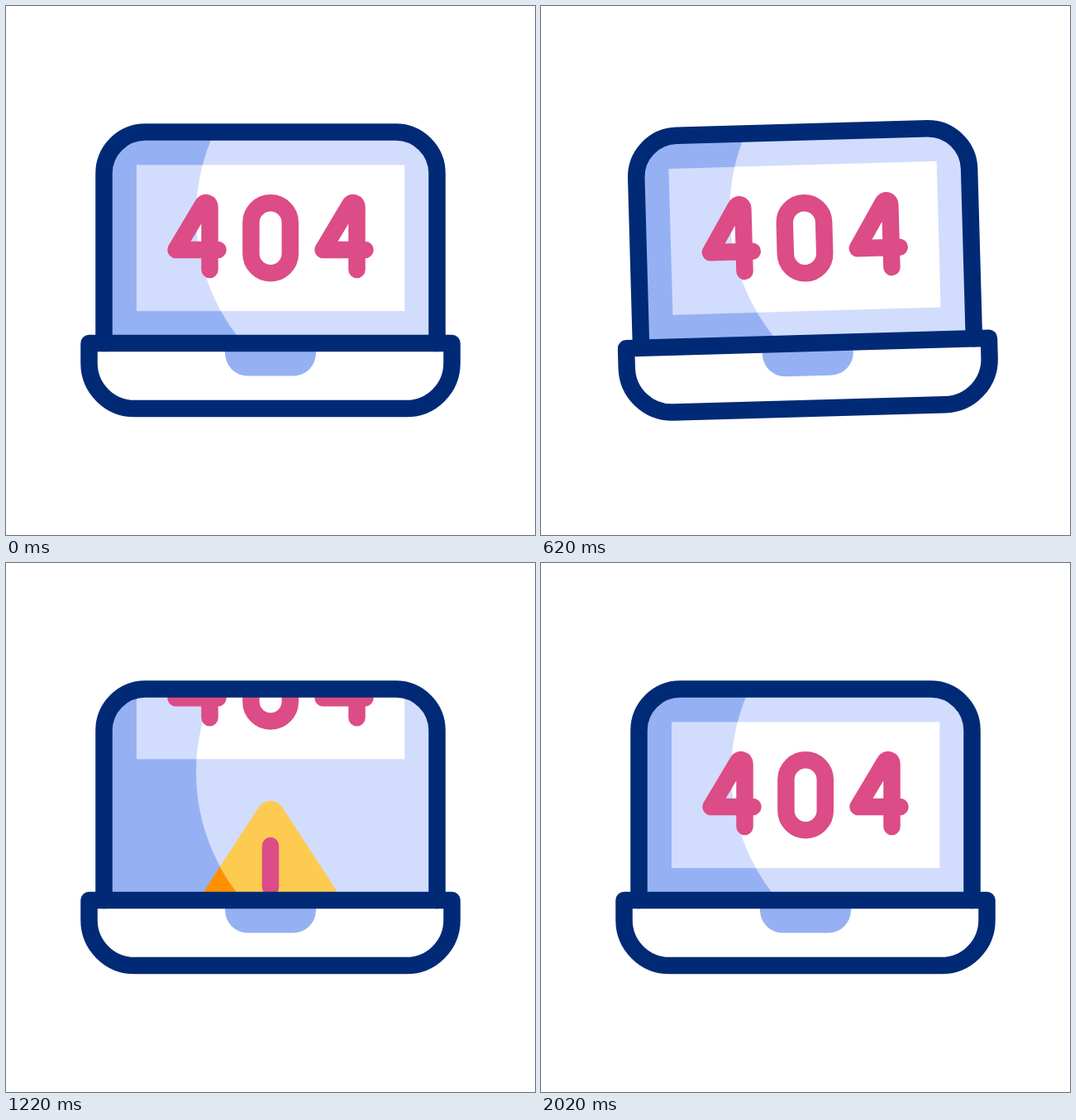
Animation, 640 px wide and 640 px high, one loop 2400 ms. Source, as an HTML page with a canvas:

```html
<!DOCTYPE html>
<html lang="en">
<head>
<meta charset="utf-8">
<title>404 laptop</title>
<style>
  html, body { margin: 0; width: 100%; height: 100%; overflow: hidden; background: #fff; }
  canvas { display: block; width: 640px; height: 640px; }
</style>
</head>
<body>
<canvas id="stage" width="640" height="640"></canvas>
<script>
const ctx = document.getElementById('stage').getContext('2d');
const LOOP = 2400;
const NAVY = '#012a76', PINK = '#dc4c86', LIGHT = '#d2dcfd', MID = '#95b1f3';
const LINE = 20.5;

const clamp = x => Math.min(1, Math.max(0, x));
const smooth = x => x * x * (3 - 2 * x);
const ramp = (t, a, b) => clamp((t - a) / (b - a));
const ease = (t, a, b) => smooth(ramp(t, a, b));

// Shapes
const lid = new Path2D('M118.5 408V202.5a50 50 0 0 1 50-50H471.5a50 50 0 0 1 50 50V408');
const base = new Path2D('M100.5 408H539.5V432a55 55 0 0 1-55 55H155.5a55 55 0 0 1-55-55Z');
const notch = new Path2D('M265 408H375V420a27.5 27.5 0 0 1-27.5 27.5H292.5a27.5 27.5 0 0 1-27.5-27.5Z');
const four = new Path2D('M256.5 295H205.5L238 240.5C240.5 236 246.5 238 246.5 243V319');
const zero = new Path2D();
zero.roundRect(296.4, 238.2, 47.4, 85.1, 23.7);
const glow = new Path2D();
glow.arc(470, 253, 240, 0, Math.PI * 2);

const sign = new Path2D();
const apex = 405.3, foot = 603.5, half = 129;
sign.moveTo(320, foot);
sign.arcTo(320 - half, foot, 320, apex, 20);
sign.arcTo(320, apex, 320 + half, foot, 17);
sign.arcTo(320 + half, foot, 320, foot, 20);
sign.closePath();

function fill(path, color) {
  ctx.fillStyle = color;
  ctx.fill(path);
}

function stroke(path, color) {
  ctx.strokeStyle = color;
  ctx.stroke(path);
}

function pages(scroll, back, panel, warn) {
  ctx.fillStyle = back;
  ctx.fillRect(100, 140, 440, 270);
  ctx.save();
  ctx.translate(0, -scroll);
  ctx.fillStyle = panel;
  ctx.fillRect(158, 192.3, 324.3, 176.8);
  fill(sign, warn);
  ctx.restore();
}

function marks(scroll) {
  ctx.save();
  ctx.translate(0, -scroll);
  stroke(four, PINK);
  stroke(zero, PINK);
  stroke(new Path2D('M320 473.8V524.2M320 555v.01'), PINK);
  ctx.translate(178, 0);
  stroke(four, PINK);
  ctx.restore();
}

// Shake: half swings of equal length, then a hop that settles
const START = 215, SWING = 83.4, TOP = 757, REST = 1012;
const TILT = 3.9, HOP = 57.3;

function pose(t) {
  if (t <= START || t >= REST) return { tilt: 0, lift: 0 };
  if (t >= TOP) {
    const left = 1 - ease(t, TOP, REST);
    return { tilt: -TILT * left, lift: -HOP * left };
  }
  const first = TOP - 6 * SWING;
  const lift = -HOP * ease(t, TOP - SWING, TOP);
  if (t < first) return { tilt: -TILT * ease(t, START, first), lift };
  const n = Math.floor((t - first) / SWING);
  const from = first + n * SWING;
  const side = n % 2 ? 1 : -1;
  return { tilt: side * TILT * (1 - 2 * ease(t, from, from + SWING)), lift };
}

// Scroll: the warning page arrives and leaves slowly
const PAGE = 231;
function scrollAt(t) {
  const u = t < 1500 ? ramp(t, REST, 1454) : 1 - ramp(t, 1541, 2012);
  return PAGE * smooth(Math.pow(u, 0.8));
}

function draw(t) {
  const { tilt, lift } = pose(t);
  const scroll = scrollAt(t);
  ctx.fillStyle = '#fff';
  ctx.fillRect(0, 0, 640, 640);
  ctx.save();
  ctx.translate(320, 320 + lift);
  ctx.rotate(tilt * Math.PI / 180);
  ctx.translate(-320, -320);
  ctx.lineWidth = LINE;
  ctx.lineCap = ctx.lineJoin = 'round';

  ctx.save();
  ctx.clip(lid);
  pages(scroll, MID, LIGHT, '#ff9100');
  ctx.save();
  ctx.clip(glow);
  pages(scroll, LIGHT, '#fff', '#fdcb50');
  ctx.restore();
  marks(scroll);
  ctx.restore();

  fill(base, '#fff');
  fill(notch, MID);
  stroke(lid, NAVY);
  stroke(base, NAVY);
  ctx.restore();
}

let begin;
function tick(now) {
  if (begin === undefined) begin = now;
  draw((now - begin) % LOOP);
  requestAnimationFrame(tick);
}
draw(0);
requestAnimationFrame(tick);
</script>
</body>
</html>
```
